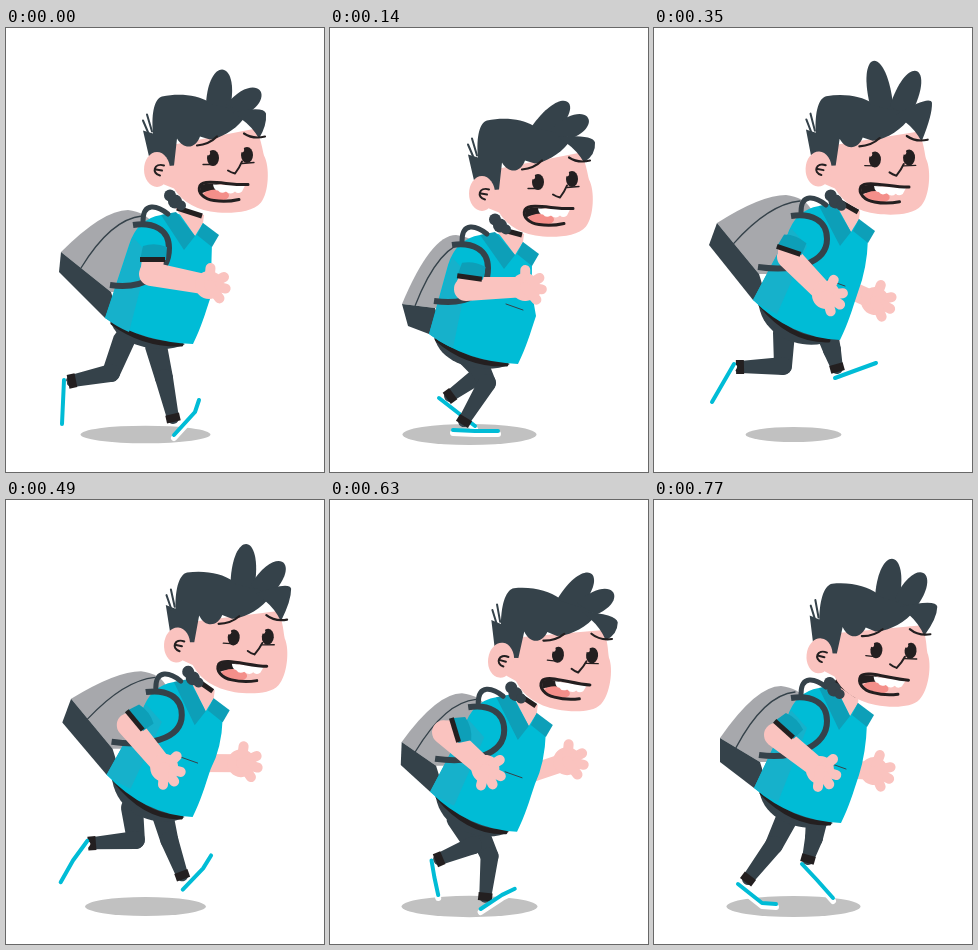
Write an HTML page with a canvas that moves like this. It is 318x444 px and loops after 0.84 s.

```html
<!DOCTYPE html>
<html lang="en">
<head>
<meta charset="utf-8">
<title>Running boy</title>
<style>
html, body { margin: 0; width: 100%; height: 100%; overflow: hidden; background: #fff; }
canvas { display: block; }
</style>
</head>
<body>
<canvas id="stage" width="318" height="444"></canvas>
<script>
const ctx = document.getElementById('stage').getContext('2d');
const DARK = '#35424a', BLACK = '#231f20', SKIN = '#fac3bf', CYAN = '#00bcd6',
  DEEP = '#0d9fb8', SHADE = '#16b1cb', GREY = '#a7a8ac';
const STEP = 70, STEPS = 12;

// Key poses of the run; one row per key time (in steps).
const times = [0, 2, 3, 5, 8, 10, 11];
const tracks = {
  // eye centre x, y, tilt in degrees
  head: [[224, 128.5, 0], [225, 152.5, 0], [228, 143.5, 0], [238, 130.5, 2], [246.5, 143.5, 5], [242, 164.5, 7], [239.5, 150.5, 6]],
  // tips of the three hair tufts, relative to the head
  tufts: [[-7, -87, 29, -67, 36, -43], [12, -79, 32, -64, 40, -38], [-11, -91, 20, -82, 39, -50], [-21, -97, 22, -88, 38, -57],
    [-3, -89, 29, -71, 37, -46], [12, -79, 30, -67, 41, -31], [-10, -91, 22, -80, 39, -48]],
  // left collar, right collar
  collar: [[155, 187, 197, 195], [150, 207, 193, 214], [157, 191, 197, 203], [165, 178, 205, 191], [168, 187, 208, 204], [164, 205, 205, 219], [165, 188, 204, 203]],
  // hem left, hem right
  hem: [[99, 290, 187, 316], [99, 306, 188, 336], [99, 290, 187, 321], [99, 272, 186, 312], [101, 280, 187, 322], [99, 302, 187, 339], [100, 288, 187, 323]],
  // outer bag corners, top of bag
  bag: [[55, 224, 53, 244, 122, 182], [72, 276, 78, 298, 126, 207], [63, 241, 64, 264, 126, 187], [63, 195, 55, 217, 132, 167],
    [67, 211, 60, 235, 135, 178], [75, 270, 80, 292, 128, 206], [66, 238, 66, 262, 127, 186]],
  // cuff x, y, tilt; elbow; hand x, y, tilt
  nearArm: [[147, 232, 0, 145, 246, 203, 257, 0], [140, 250, 8, 136, 261, 195, 259, -4], [138, 236, 19, 134, 244, 188, 262, 5], [135, 223, 19, 135, 229, 172, 267, 22],
    [126, 223, 65, 117, 226, 154, 268, 50], [125, 238, 72, 114, 239, 160, 270, 52], [130, 230, 42, 122, 235, 166, 270, 45]],
  farArm: [[186, 255, 0], [188, 262, 0], [199, 281, 40], [221, 273, 15], [239, 260, 0], [231, 265, 4], [220, 271, 15]],
  // hip, knee, ankle, heel, ball, toe
  legA: [[150, 318, 158, 350, 167, 390, 168, 407, 189, 384, 193, 372], [143, 325, 157, 355, 134, 393, 123, 402, 145, 403, 168, 403],
    [138, 318, 128, 347, 102, 380, 92, 384, 116, 402, 131, 403], [130, 305, 129, 338, 86, 339, 80, 336, 69, 355, 58, 374],
    [126, 312, 133, 342, 92, 350, 87, 349, 77, 368, 69, 389], [135, 325, 155, 347, 132, 367, 122, 371, 139, 385, 156, 400],
    [163, 318, 160, 338, 154, 359, 148, 364, 163, 380, 179, 398]],
  legB: [[118, 312, 105, 345, 66, 353, 58, 352, 57, 374, 56, 396], [135, 325, 152, 345, 120, 368, 109, 370, 127, 384, 145, 398],
    [164, 315, 157, 338, 147, 357, 139, 362, 157, 376, 175, 390], [173, 305, 178, 322, 183, 340, 181, 350, 200, 343, 222, 335],
    [147, 316, 156, 350, 167, 392, 167, 407, 188, 384, 192, 372], [143, 328, 159, 358, 136, 394, 126, 402, 148, 403, 171, 404],
    [133, 318, 120, 345, 94, 379, 84, 384, 108, 403, 122, 404]],
  // radii
  shadow: [[65, 8.8], [67, 10.5], [67, 10.5], [48, 7.5], [67, 10.5], [67, 10.5], [67, 10.5]]
};

// Smooth curve through the keys of one track.
function sample(rows, s) {
  let i = 0;
  while (i < times.length - 2 && s >= times[i + 1]) i++;
  const span = times[i + 1] - times[i], u = (s - times[i]) / span;
  const slope = (k, c) => {
    const a = Math.max(k - 1, 0), b = Math.min(k + 1, times.length - 1);
    return (rows[b][c] - rows[a][c]) / (times[b] - times[a]) * span;
  };
  return rows[i].map((p, c) => {
    const d = rows[i + 1][c] - p, m = slope(i, c), n = slope(i + 1, c);
    return p + u * (m + u * (3 * d - 2 * m - n + u * (m + n - 2 * d)));
  });
}

function fill(path, color) {
  ctx.fillStyle = color;
  ctx.fill(new Path2D(path));
}
function stroke(path, color, width, cap = 'round') {
  ctx.strokeStyle = color;
  ctx.lineWidth = width;
  ctx.lineCap = cap;
  ctx.lineJoin = 'round';
  ctx.stroke(new Path2D(path));
}
function oval(x, y, rx, ry, color) {
  ctx.fillStyle = color;
  ctx.beginPath();
  ctx.ellipse(x, y, rx, ry, 0, 0, 7);
  ctx.fill();
}
function placed(x, y, degrees, draw) {
  ctx.save();
  ctx.translate(x, y);
  ctx.rotate(degrees * Math.PI / 180);
  draw();
  ctx.restore();
}
// Limb that changes width from one end to the other.
function taper(x1, y1, x2, y2, r1, r2, color) {
  const a = Math.atan2(y2 - y1, x2 - x1);
  ctx.fillStyle = color;
  ctx.beginPath();
  ctx.arc(x1, y1, r1, a + Math.PI / 2, a - Math.PI / 2);
  ctx.arc(x2, y2, r2, a - Math.PI / 2, a + Math.PI / 2);
  ctx.fill();
}
// Rounded tuft on the base a-b.
function tuft(ax, ay, bx, by, tx, ty, w) {
  const mx = (ax + bx) / 2, my = (ay + by) / 2, len = Math.hypot(tx - mx, ty - my);
  const cx = (4 * tx - mx) / 3, cy = (4 * ty - my) / 3;
  const nx = -(ty - my) / len * w, ny = (tx - mx) / len * w;
  fill(`M${ax} ${ay}C${cx - nx} ${cy - ny} ${cx + nx} ${cy + ny} ${bx} ${by}Z`, DARK);
}
function hand(x, y, tilt) {
  placed(x, y, tilt, () => {
    oval(0, 0, 14, 14, SKIN);
    for (const a of [-85, -28, 12, 52]) {
      const r = a * Math.PI / 180;
      stroke(`M0 0L${17 * Math.cos(r)} ${17 * Math.sin(r)}`, SKIN, 10);
    }
  });
}

function leg([hx, hy, kx, ky, ax, ay, x1, y1, x2, y2, x3, y3]) {
  taper(hx, hy, kx, ky, 11, 9, DARK);
  taper(kx, ky, ax, ay, 9, 6, DARK);
  const len = Math.hypot(ax - kx, ay - ky), ux = (ax - kx) / len, uy = (ay - ky) / len;
  stroke(`M${ax - 4 * ux} ${ay - 4 * uy}L${ax + 4 * ux} ${ay + 4 * uy}`, BLACK, 14, 'butt');
  const shoe = `M${x1} ${y1}L${x2} ${y2}L${x3} ${y3}`;
  placed(0, 3, 0, () => stroke(shoe, '#fff', 6));
  stroke(shoe, CYAN, 4);
}

function bag([ax, ay, bx, by, tx, ty], [lx, ly]) {
  const dx = lx + 6, dy = ly - 26;
  fill(`M${ax} ${ay}Q${tx - 25} ${ty} ${tx} ${ty}Q${tx + 18} ${ty + 2} ${tx + 25} ${ty + 14}L${dx + 25} ${dy}L${dx} ${dy}Z`, GREY);
  fill(`M${ax} ${ay}L${bx} ${by}L${lx} ${ly}L${lx + 14} ${ly}L${dx} ${dy}Z`, DARK);
  const sx = ax + (dx - ax) * .4, sy = ay + (dy - ay) * .4;
  stroke(`M${sx} ${sy}Q${tx - 17} ${ty + 9} ${tx + 14} ${ty + 6}`, DARK, 1.3);
}

function torso([kx, ky, vx, vy], [lx, ly, rx, ry]) {
  const hem = `Q${lx + 38} ${ry - 2} ${rx} ${ry}`;
  fill(`M${lx + 5} ${ly}C${lx + 8} ${ry + 2} ${lx + 58} ${ry + 12} ${rx - 8} ${ry}Z`, DARK);
  stroke(`M${lx + 8} ${ly + 5}Q${lx + 38} ${ry + 1} ${rx - 12} ${ry}`, BLACK, 5);
  fill(`M${kx} ${ky}Q${kx - 24} ${ky + 4} ${kx - 32} ${ky + 30}L${lx} ${ly}${hem}C${rx + 8} ${ry - 16} ${rx + 12} ${ry - 30} ${rx + 18} ${ry - 48}`
    + `Q${vx + 8} ${vy + 50} ${vx + 9} ${vy + 20}L${vx} ${vy}L${kx + 15} ${ky - 2}Z`, CYAN);
  fill(`M${kx - 28} ${ky + 22}L${lx} ${ly}Q${lx + 12} ${ly + 9} ${lx + 24} ${ly + 14}L${kx - 12} ${ky + 40}Z`, SHADE);
  stroke(`M${rx - 12} ${ry - 60}L${rx + 5} ${ry - 54}`, DARK, 1);
  fill(`M${kx + 13} ${ky - 9}L${vx + 1} ${vy - 8}L${vx} ${vy}L${vx - 8} ${vy + 13}Z`, SKIN);
  fill(`M${kx} ${ky}L${kx + 15} ${ky - 3}L${vx - 8} ${vy + 13}L${vx - 19} ${vy + 27}Z`, DEEP);
  fill(`M${vx} ${vy}L${vx + 16} ${vy + 12}L${vx + 9} ${vy + 24}L${vx - 6} ${vy + 12}Z`, DEEP);
  stroke(`M${kx + 16} ${ky - 7}L${vx - 1} ${vy - 7}`, BLACK, 5, 'butt');
  const ex = lx + 5, ey = ly - 33;
  stroke(`M${kx - 18} ${ky + 6}C${kx - 18} ${ky - 13} ${kx - 4} ${ky - 10} ${kx + 7} ${ky - 1}`, DARK, 5);
  stroke(`M${kx - 28} ${ky + 10}C${kx - 8} ${ky + 7} ${kx + 8} ${ky + 14} ${kx + 8} ${ky + 33}C${kx + 8} ${ky + 58} ${ex + 35} ${ey + 5} ${ex} ${ey}`, DARK, 6, 'butt');
}

function nearArm([cx, cy, tilt, ex, ey, hx, hy, turn]) {
  taper(cx, cy, ex, ey, 11, 11, SKIN);
  taper(ex, ey, hx, hy, 12, 10, SKIN);
  hand(hx, hy, turn);
  placed(cx, cy, tilt, () => {
    fill('M-13 0L-10 -14Q2 -18 14 -13L13 0Z', DEEP);
    fill('M-13 -3H12V2H-13Z', BLACK);
  });
}

function head([x, y, tilt], [ax, ay, bx, by, cx, cy]) {
  placed(x, y, tilt, () => {
    for (const [hx, hy, r] of [[-60, 39, 6], [-55, 45, 7], [-49, 49, 5]]) oval(hx, hy, r, r, DARK);
    fill('M-66 -10L26 -28C32 -14 32 -8 34 -1C40 10 39 36 31 46C23 56 2 57 -12 56C-33 54 -47 46 -56 32L-66 28Z', SKIN);
    fill('M-81 0L-87 -26L-77 -23C-79 -45 -75 -58 -68 -60C-50 -64 -32 -61 -22 -55C-5 -66 12 -55 14 -38'
      + 'C4 -25 -11 -18 -20 -17L-30 -20C-34 -8 -46 -6 -53 -18L-56 9L-68 10Z', DARK);
    tuft(-24, -53, 0, -48, ax, ay, 16);
    tuft(-4, -52, 16, -42, bx, by, 17);
    fill(`M2 -44Q${cx - 2} ${cy - 8} ${cx} ${cy}Q${cx + 1} ${cy + 12} 29 -18Q22 -30 12 -37Z`, DARK);
    stroke('M-87 -36L-81 -22M-83 -42L-78 -25', DARK, 2);
    oval(-73, 13, 13, 17.5, SKIN);
    stroke('M-66 9C-76 6 -79 17 -70 19M-74 13L-68 14', BLACK, 2);
    for (const [ex, ey] of [[-17, 1.5], [17, -1.5]]) {
      oval(ex, ey, 6, 8, BLACK);
      oval(ex - 5, ey - 5, 2.2, 2.4, SKIN);
    }
    stroke('M-27 8H-16M12 7L24 6', BLACK, 1.3);
    stroke('M12 5C10 10 8 13 5 17M5 17Q1 16 -2 14', BLACK, 2);
    stroke('M-33 -11Q-21 -12 -13 -20M14 -23Q23 -17 35 -20', BLACK, 2.2);
    fill('M-31 29C-25 22 0 29 18 28C12 31 10 36 11 42C-6 48 -28 46 -31 29Z', SKIN);
    fill('M-30 29Q-20 25 -8 29L-10 36Q-22 33 -29 37Z', BLACK);
    oval(-14, 39, 13, 6, '#f48f8a');
    fill('M-17 28L15 29L12 35Q8 38 5 35Q1 39 -4 35Q-9 38 -12 34Q-16 34 -17 28Z', '#fff');
    stroke('M18 28C0 29 -25 22 -30 29C-33 36 -26 43 -16 44Q-4 46 9 43', BLACK, 3);
  });
}

function draw(step) {
  const pose = {};
  for (const name in tracks) pose[name] = sample(tracks[name], step);
  const { hem, collar, farArm } = pose;
  ctx.fillStyle = '#fff';
  ctx.fillRect(0, 0, 318, 444);
  oval(139.5, 406.5, ...pose.shadow, '#c1c1c1');
  taper(188, hem[3] - 54, farArm[0], farArm[1], 9, 9, SKIN);
  hand(...farArm);
  bag(pose.bag, hem);
  leg(pose.legB);
  leg(pose.legA);
  torso(collar, hem);
  nearArm(pose.nearArm);
  head(pose.head, pose.tufts);
}

function tick() {
  draw(Math.floor(performance.now() / STEP) % STEPS);
  requestAnimationFrame(tick);
}
tick();
</script>
</body>
</html>
```
